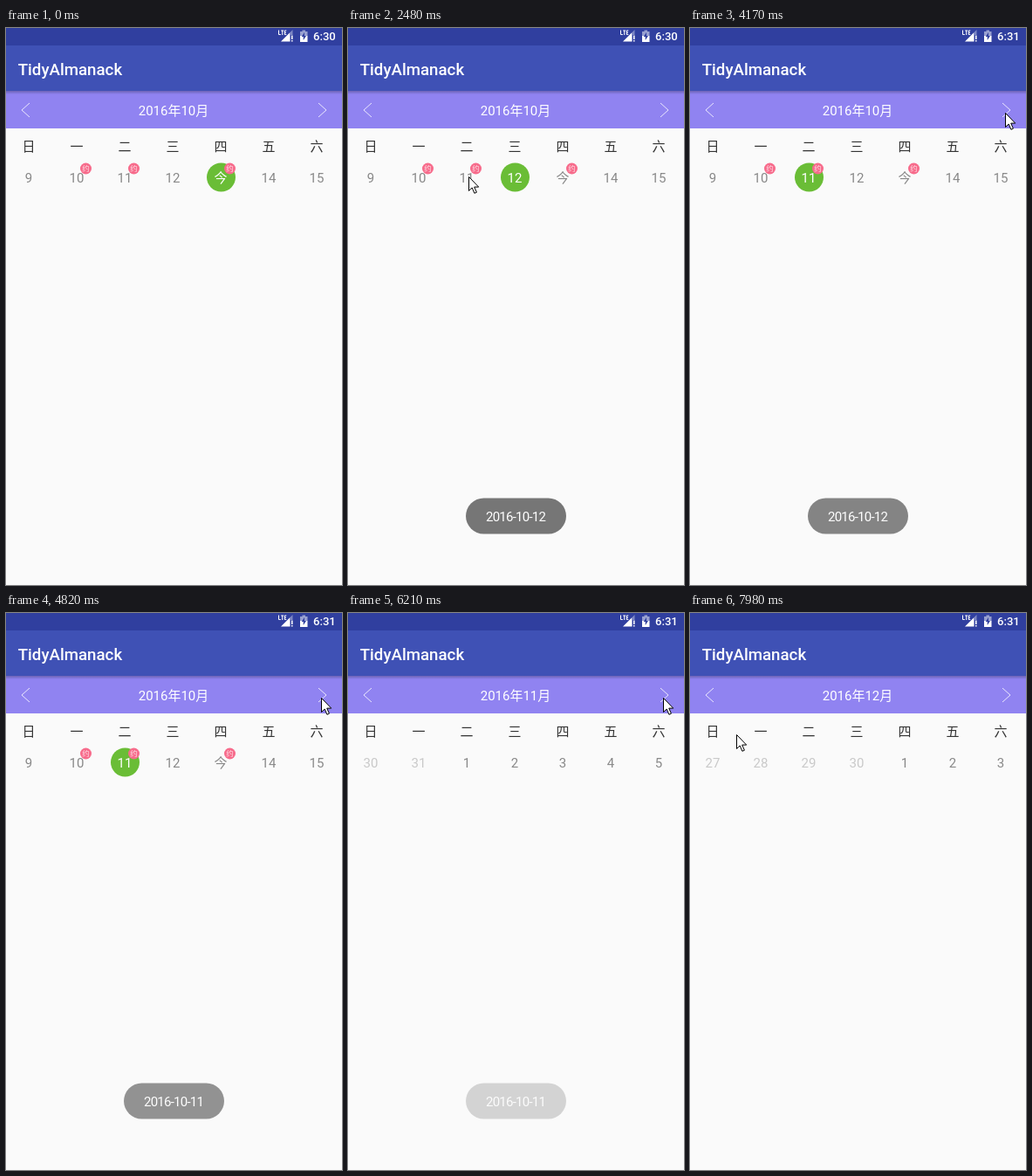
Recreate the animation shown at these times as an HTML page. Size 385x638 px, loop 8000 ms.

```html
<!DOCTYPE html>
<html lang="zh">
<head>
<meta charset="utf-8">
<title>Week view</title>
<style>
  html, body { margin: 0; width: 100%; height: 100%; overflow: hidden; background: #fafafa; }
  svg { display: block; position: absolute; left: 0; top: 0; }
  text { font-family: Roboto, "Noto Sans CJK SC", "Noto Sans CJK", sans-serif; font-size: 15px; }
  .mid { text-anchor: middle; }
  .bold { font-weight: 500; fill: #fff; }
  .day { fill: #888; }
  .dim { fill: #c9c9c9; }
  .picked .day { fill: #fff; }
  .disc { fill: none; }
  .picked .disc { fill: #6abd36; }
  .tag { font-size: 8.5px; fill: #fff; opacity: .8; }
</style>
</head>
<body>
<svg width="385" height="638" viewBox="0 0 385 638">
  <defs>
    <linearGradient id="shade" x2="0" y2="1">
      <stop offset="0" stop-opacity=".25"/>
      <stop offset="1" stop-opacity="0"/>
    </linearGradient>
    <clipPath id="pane"><rect y="115" width="385" height="80"/></clipPath>
  </defs>
  <rect width="385" height="20" fill="#303f9f"/>
  <rect y="20" width="385" height="52" fill="#3f51b5"/>
  <rect y="72" width="385" height="43" fill="#9083f1"/>
  <rect y="72" width="385" height="4" fill="url(#shade)"/>

  <!-- status icons -->
  <path d="M312.5 2.5v5h2.3M315.2 3h3M316.7 3v5M321.3 3h-2v4.5h2M319.3 5.3h1.7" fill="none" stroke="#fff"/>
  <path d="M315 15.5L325.5 5v10.5z" fill="#fff"/>
  <path d="M325.5 5l3-3v6h-3z" fill="#7d87c4"/>
  <path d="M327 8.5h1.5v4.5h-1.5zM327 14h1.5v1.5h-1.5z" fill="#fff"/>
  <path d="M337 4h2.5v-1.5h3.5v1.5h2.5v5h-8.5z" fill="#98a0d0"/>
  <path d="M337 9h8.5v7h-8.5z" fill="#fff"/>
  <path d="M342 5l-3.3 5h2v4l3.3-5h-2z" fill="#303f9f"/>
  <text id="clock" class="bold" x="352" y="14" style="font-size:13.1px"></text>

  <text class="bold" x="13.7" y="54" style="font-size:18.7px">TidyAlmanack</text>
  <path d="M27 86l-9 8 9 8M358 86l9 8-9 8" fill="none" stroke="#fff" opacity=".8"/>
  <text id="month" class="mid" x="192" y="100" fill="#fff"></text>

  <g clip-path="url(#pane)"><g id="pages"></g></g>

  <g id="toast">
    <rect x="135" y="538.5" width="115" height="41" rx="20.5" fill="#646464"/>
    <text id="note" x="158" y="565" fill="#fff" letter-spacing="-.75"></text>
  </g>
  <path id="cursor" d="M.5.5v16l3.7-3.5 2.7 6.3 2.5-1.1-2.7-6.1h5z" fill="#fff" stroke="#000" stroke-linejoin="round"/>
</svg>
<script>
const LOOP = 8000, WIDTH = 385, COL = 55, STEP = 136, PHASE = 80;
const PICK_12 = 2000, PICK_11 = 2870, MINUTE = 3430, NOVEMBER = 4850, DECEMBER = 6500;
const $ = id => document.getElementById(id);

function add(parent, tag, attrs, text) {
  const el = document.createElementNS('http://www.w3.org/2000/svg', tag);
  for (const k in attrs) el.setAttribute(k, attrs[k]);
  if (text !== undefined) el.textContent = text;
  return parent.appendChild(el);
}

// Eight weekly pages from Sunday 9 October 2016
const firstWeek = {};

function addDay(page, p, c) {
  const date = new Date(2016, 9, 9 + p * 7 + c);
  const month = new Date(2016, 9, 15 + p * 7).getMonth();
  const d = date.getDate(), x = 26 + c * COL;
  const today = p === 0 && d === 13;
  add(page, 'text', { class: 'mid', x, y: 141, fill: '#333' }, '日一二三四五六'[c]);
  const cell = add(page, 'g', {});
  add(cell, 'circle', { class: 'disc', cx: x + .5, cy: 171, r: 16.5 });
  const tone = date.getMonth() === month ? 'mid day' : 'mid day dim';
  add(cell, 'text', { class: tone, x, y: 177 }, today ? '今' : d);
  if (p > 0) return;
  firstWeek[d] = cell;
  if (today || d === 10 || d === 11) {
    add(cell, 'circle', { cx: x + 10.5, cy: 161, r: 6.5, fill: '#f76b8b' });
    add(cell, 'text', { class: 'mid tag', x: x + 10.5, y: 164 }, '约');
  }
}

for (let p = 0; p < 8; p++) {
  const page = add($('pages'), 'g', { transform: `translate(${p * WIDTH})` });
  for (let c = 0; c < 7; c++) addDay(page, p, c);
}

const part = (t, start, span) => Math.min(1, Math.max(0, (t - start) / span));
const easeOut = (u, power = 2) => 1 - (1 - u) ** power;
const mix = (a, b, u) => a + (b - a) * u;
const pulse = (t, rise, fall) => easeOut(part(t, rise, 600)) * (1 - part(t, fall, 340) ** 2);

// The pointer swings in along a curve, then moves in straight lines
function pointer(t) {
  const u = easeOut(part(t, 488, 950), 1.4), v = 1 - u;
  let x = v * v * 373 + 2 * u * v * 345 + u * u * 193;
  let y = v * v * 182 + 2 * u * v * 42 + u * u * 170;
  const go = (k, tx, ty) => { x = mix(x, tx, k); y = mix(y, ty, k); };
  go(part(t, 2100, 290), 138, 170);
  go(part(t, 3120, 700), 361, 97);
  go(easeOut(part(t, 6700, 1260)), 53, 139);
  return [x, y].map(Math.round);
}

function draw(t) {
  // Movement is seen in even steps; taps act at once
  const s = Math.floor((t - PHASE) / STEP) * STEP + PHASE;

  $('clock').textContent = t < MINUTE ? '6:30' : '6:31';
  $('month').textContent = `2016年${t < NOVEMBER ? 10 : t < DECEMBER ? 11 : 12}月`;

  const picked = t < PICK_12 ? 13 : t < PICK_11 ? 12 : 11;
  for (const d in firstWeek) firstWeek[d].setAttribute('class', +d === picked ? 'picked' : '');

  const page = 3 * easeOut(part(s, NOVEMBER, 400), 5) + 4 * easeOut(part(s, DECEMBER, 500), 5);
  $('pages').setAttribute('transform', `translate(${(-page * WIDTH).toFixed(1)})`);

  $('note').textContent = '2016-10-' + (s < 4400 ? 12 : 11);
  $('toast').setAttribute('opacity', pulse(s, PICK_12, 4000) + pulse(s, 4440, 5906));

  $('cursor').setAttribute('transform', `translate(${pointer(s)})`);
  $('cursor').setAttribute('visibility', t < 500 ? 'hidden' : 'visible');
}

function frame() {
  draw(performance.now() % LOOP);
  requestAnimationFrame(frame);
}
frame();
</script>
</body>
</html>
```
